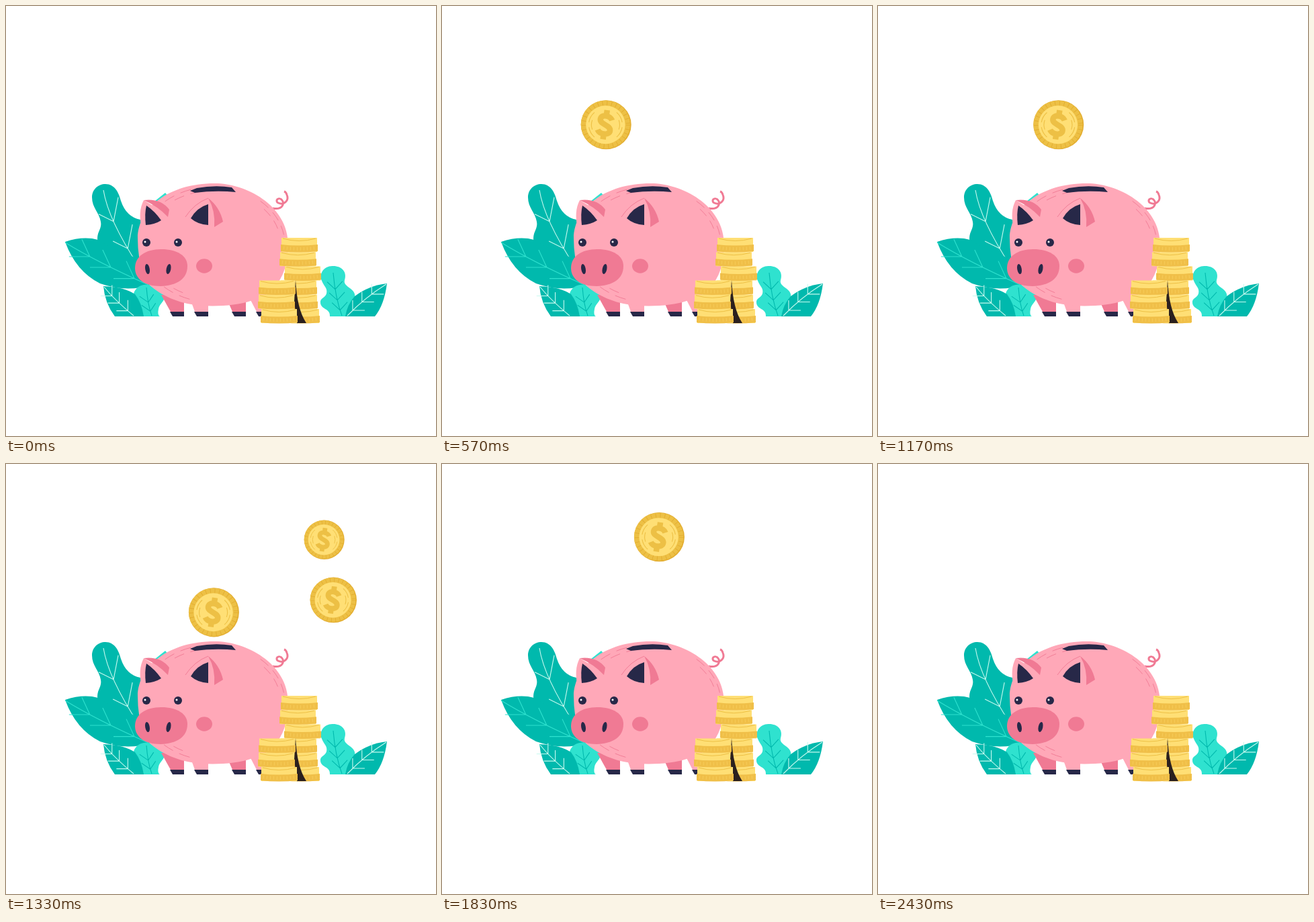
An HTML page with a canvas that plays this animation: 640 by 640 pixels, repeating every 2.63 s.

```html
<!DOCTYPE html>
<html lang="en">
<head>
<meta charset="utf-8">
<title>Piggy bank</title>
<style>
  html, body { margin: 0; width: 100%; height: 100%; overflow: hidden; background: #fff; }
  canvas { display: block; width: 100%; height: 100%; }
</style>
</head>
<body>
<canvas id="stage" width="640" height="640"></canvas>
<script>
  const ctx = document.getElementById('stage').getContext('2d');
  const LOOP = 2630, RADIUS = 37.5, GROW = 120, SLOT = 312;
  const TEAL = '#00b9ad', MINT = '#2fe2cf', PALE = '#c8faf0';
  const PINK = '#ffa8b8', ROSE = '#f07a94', NAVY = '#272848';
  const GOLD = '#edc045', LIGHT = '#ffdf75', AMBER = '#e3ae32';

  function fill(color, d) {
    ctx.fillStyle = color;
    ctx.fill(new Path2D(d));
  }

  function stroke(color, width, d, dash = []) {
    ctx.strokeStyle = color;
    ctx.lineWidth = width;
    ctx.setLineDash(dash);
    ctx.stroke(new Path2D(d));
  }

  function oval(color, x, y, rx, ry = rx, tilt = 0) {
    ctx.fillStyle = color;
    ctx.beginPath();
    ctx.ellipse(x, y, rx, ry, tilt, 0, 7);
    ctx.fill();
  }

  // Bent midrib from tip to base, with n pairs of side veins reaching out by two offsets
  function veins(color, tip, bend, base, n, left, right) {
    let d = `M${tip}Q${bend} ${base}`;
    for (let i = 0; i < n; i++) {
      const u = (i + 1.4) / (n + 1), v = 1 - u;
      const [x, y] = [0, 1].map(k => v * v * tip[k] + 2 * u * v * bend[k] + u * u * base[k]);
      d += `M${x + left[0]} ${y + left[1]}L${x} ${y}l${right}`;
    }
    stroke(color, 1.1, d);
  }

  function drawPlants() {
    fill(TEAL, 'M148 265C162 265 168 278 171 290Q179 314 200 318L230 340V415L190 392C168 383 136 365 136 346C136 335 143 331 141 321C139 308 128 300 128 285C128 273 137 265 148 265Z');
    veins(PALE, [145, 274], [152, 318], [198, 388], 2, [-22, -11], [7, -36]);
    fill(TEAL, 'M88 351Q115 342 137 348Q160 362 191 374L216 415Q180 427 140 413Q104 395 88 351Z');
    veins(MINT, [88, 352], [135, 381], [214, 416], 3, [-12, -26], [-31, 0]);
    fill(MINT, 'M222 290L237 278L243 285L228 300Z');
    fill(MINT, 'M190 428C193 417 205 412 215 416L236 430C237 440 228 443 227 451Q225 460 229 462H198C206 449 190 444 190 428Z');
    veins(TEAL, [209, 419], [211, 445], [217, 461], 2, [-13, -9], [8, -12]);
    fill(TEAL, 'M145 417Q176 418 192 429Q202 442 205 462H162Q147 442 145 417Z');
    veins(PALE, [146, 418], [160, 436], [190, 461], 3, [0, -16], [-17, 0]);

    fill(MINT, 'M487 387C474 386 465 398 470 409C473 417 479 420 477 428C475 435 467 434 468 442C469 452 483 450 482 462H507L519 435C523 420 501 419 504 408C508 396 500 387 487 387Z');
    veins(TEAL, [487, 397], [490, 434], [500, 461], 3, [-12, -11], [11, -12]);
    fill(TEAL, 'M567 413Q563 445 549 462H505Q508 444 519 432Q540 416 567 413Z');
    veins(PALE, [566, 414], [534, 434], [508, 461], 3, [0, -15], [18, 0]);
  }

  function drawLeg(x, color, lean) {
    fill(color, `M${x - lean} 430H${x + 22}V455H${x + 2}Z`);
    fill(NAVY, `M${x + 1} 455H${x + 22}V462H${x + 5}Z`);
  }

  // Staggered short arcs that follow the outline of the body
  function hatch(from, count) {
    ctx.strokeStyle = ROSE;
    ctx.lineWidth = .9;
    for (let i = 0; i < count; i++) {
      const inset = 5 + i % 2 * 6, a = from + i * .13;
      ctx.beginPath();
      ctx.ellipse(308, 355, 112 - inset, 91 - inset, 0, a, a + .16);
      ctx.stroke();
    }
  }

  function drawPig() {
    [[243, ROSE, 12], [335, ROSE, 9], [279, PINK, 7], [371, PINK, 11]].forEach(leg => drawLeg(...leg));
    stroke(ROSE, 3, 'M397 301C411 304 416 294 410 288C405 284 400 290 405 293C413 297 422 290 418 281Q417 277 414 276');
    fill(PINK, 'M311 264C355 264 420 295 420 356C420 402 398 432 364 439C340 447 298 449 270 443C243 437 217 423 205 405Q196 375 196 345C197 302 240 264 311 264Z');
    [[-2.3, 4], [-.85, 5], [1.9, 5]].forEach(group => hatch(...group));
    fill(NAVY, 'M274 275L284 271Q311 266 336 270L342 277Q312 274 281 278Z');

    fill(PINK, 'M202 331Q196 306 205 289L240 310L232 325Z');
    fill(ROSE, 'M205 289Q230 286 243 303L241 314Q226 298 205 289Z');
    fill(NAVY, 'M209 297Q221 305 231 319Q222 325 208 326Q206 309 209 297Z');
    stroke(ROSE, .9, 'M267 314Q280 294 301 286');
    fill(ROSE, 'M301 286Q318 299 323 321L310 329Q312 305 301 286Z');
    fill(NAVY, 'M301 295V326Q285 325 275 316Q284 300 301 295Z');

    for (const x of [209, 256]) {
      oval(NAVY, x, 352, 6);
      oval('#fff', x - 2, 351, 1.5);
    }
    fill(ROSE, 'M231 362C255 362 270 372 270 387C270 406 255 416 230 417C206 417 192 406 192 390C192 373 207 362 231 362Z');
    oval(NAVY, 210.5, 391.5, 3.3, 7.7, -.17);
    oval(NAVY, 242, 391.5, 3.3, 7.7, .2);
    oval(ROSE, 295, 387, 12, 10.7);
  }

  // Coins piled up from the ground, each shifted sideways
  function drawStack(x, shifts) {
    shifts.forEach((shift, i) => {
      ctx.save();
      ctx.translate(x + shift, 451 - i * 21.2);
      fill(LIGHT, 'M0 0H53V21H0Z');
      stroke(GOLD, 1, 'M2 1Q26 8 51 1');
      fill('#f0bf48', 'M-1 10Q26 13 54 10V20Q26 23 -1 20Z');
      stroke('#f6cb58', 5, 'M3 15Q26 18 50 15', [1, 4]);
      ctx.restore();
    });
  }

  function drawCoin(x, y, size) {
    ctx.save();
    ctx.translate(x, y);
    ctx.scale(size, size * .975);
    oval(AMBER, 0, 0, RADIUS);
    oval(GOLD, -.8, -.4, RADIUS - .8);
    ctx.strokeStyle = AMBER;
    ctx.lineWidth = 7;
    ctx.setLineDash([1, 5.8]);
    ctx.beginPath();
    ctx.arc(0, 0, 33, 0, 7);
    ctx.stroke();
    ctx.setLineDash([]);
    oval(LIGHT, -.8, 0, 29.2);
    ctx.strokeStyle = GOLD;
    ctx.lineWidth = 1.1;
    for (let i = 0; i < 6; i++) {
      const a = (i % 3 - 1) * .5 + (i < 3 ? 0 : Math.PI);
      ctx.beginPath();
      ctx.arc(-.8, 0, i % 3 === 1 ? 21 : 25, a - .35, a + .35);
      ctx.stroke();
    }
    ctx.translate(-1.5, 0);
    ctx.rotate(.14);
    stroke(GOLD, 8.5, 'M9.5 -8C6 -15 -8 -16 -8 -7.5C-8 1 8.5 -1 8.5 8C8.500 16 -6 16 -10 9M0 -22.5V-12M0 12V22.5');
    ctx.restore();
  }

  // Each path holds four waypoints: time, x, y
  const flights = [
    { born: 300, gone: 1520, side: -1,
      path: [[300, 125, 290], [570, 244, 177], [930, 259.5, 141.5], [1330, 309, 220.5]] },
    { born: 1235, gone: 1600, side: 1,
      path: [[1240, 510, 170], [1330, 474.5, 113], [1420, 390, 120], [1530, SLOT, 245]] },
    { born: 1220, gone: 2430, side: 1,
      path: [[1330, 488, 203], [1530, 383, 118.7], [1830, 323.5, 108.5], [2170, 313, 208]] }
  ];

  // Cubic through the waypoints
  function along(path, t, axis) {
    return path.reduce((sum, p) => sum + path.reduce(
      (w, q) => q === p ? w : w * (t - q[0]) / (p[0] - q[0]), p[axis]), 0);
  }

  // Everything but the inside of the bank, below the slot
  const outside = new Path2D('M0 0H640V640H400V277H342Q312 274 281 278H230V640H0Z');

  function drawFlights(t) {
    ctx.save();
    ctx.clip(outside);
    for (const { born, gone, side, path } of flights) {
      if (t <= born || t >= gone) continue;
      const x = SLOT + side * Math.max(0, side * (along(path, t, 1) - SLOT));
      drawCoin(x, along(path, t, 2), Math.min(1, (t - born) / GROW));
    }
    ctx.restore();
  }

  function tick() {
    ctx.clearRect(0, 0, 640, 640);
    drawPlants();
    drawPig();
    drawStack(410, [3, 0, -1, 5, -2, 0]);
    fill('#2b201e', 'M431 408Q433 451 447 472H433L429 440Z');
    drawStack(377, [3, -1, 0]);
    drawFlights(performance.now() % LOOP);
    requestAnimationFrame(tick);
  }
  tick();
</script>
</body>
</html>
```
